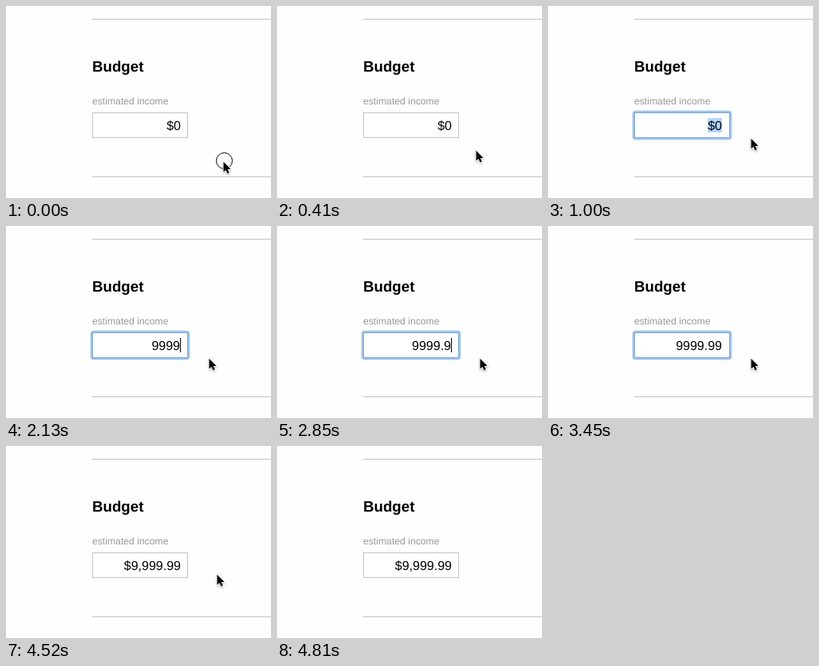
Write an HTML page that moves like this. It is 332 px wide and 240 px high and loops after 5.33 s.

```html
<!DOCTYPE html>
<html lang="en">
<head>
<meta charset="utf-8">
<title>Budget field</title>
<style>
  html, body { margin: 0; width: 100%; height: 100%; overflow: hidden; background: #fefefe; }
  svg { display: block; width: 100vw; height: 100vh; }
  text { font-family: "Liberation Sans", Arial, sans-serif; text-rendering: geometricPrecision; white-space: pre; }
  #arrow { filter: drop-shadow(0 1px 1px rgba(0, 0, 0, .3)); }
</style>
</head>
<body>
<svg viewBox="0 0 332 240">
  <rect width="332" height="240" fill="#fefefe"/>
  <path d="M108 16.5H332M108 213.5H332" stroke="#c2c2c2"/>
  <text x="108" y="82" font-size="18.72" font-weight="700">Budget</text>
  <text x="108" y="123" font-size="12.2" fill="#999">estimated income</text>

  <g id="glow" fill="none" stroke="#6ea6e4">
    <rect x="108" y="133" width="120" height="32" rx="2" stroke-width="5.5" opacity=".3"/>
    <rect x="108" y="133" width="120" height="32" rx="1" stroke-width="3.4" opacity=".6"/>
  </g>
  <rect id="field" x="108.5" y="133.5" width="119" height="31" fill="#fff"/>
  <rect id="highlight" x="200" y="140" width="18" height="18" fill="#b4d4fd"/>
  <text id="value" y="155" font-size="16" text-anchor="end"></text>
  <rect id="caret" x="218" y="140" width="1" height="18"/>

  <circle id="ring" r="10" fill="none" stroke="#000"/>
  <path id="beam" d="M-2.5 -7.5Q0 -7.5 0 -5.5Q0 -7.5 2.5 -7.5M0 -6V6M-2.5 7.5Q0 7.5 0 5.5Q0 7.5 2.5 7.5" fill="none" stroke="#111"/>
  <path id="arrow" d="M.5 .8V13.6L3.4 10.9L5.5 15.6L7.7 14.6L5.7 10.1H9.6Z" stroke="#fff" stroke-width="1.6" paint-order="stroke"/>
</svg>
<script>
const LOOP = 5330;
const $ = id => document.getElementById(id);
const [glow, field, highlight, value, caret, ring, beam, arrow] =
  ["glow", "field", "highlight", "value", "caret", "ring", "beam", "arrow"].map($);

const smooth = p => p * p * (3 - 2 * p);
const easeOut = p => 1 - (1 - p) ** 1.6;
const easeIn = p => p ** 1.3;

// The pointer is sampled in even steps: first step, last step, step count.
const moves = [
  { start: 60, end: 60, steps: 1, from: [272, 194], to: [270, 193], ease: smooth },
  { start: 240, end: 640, steps: 8, from: [270, 193], to: [203.5, 150.5], ease: smooth },
  { start: 760, end: 760, steps: 1, from: [203.5, 150.5], to: [224.5, 150], ease: smooth },
  { start: 820, end: 1000, steps: 4, from: [224.5, 150], to: [254, 165], ease: easeOut },
  { start: 3510, end: 3920, steps: 8, from: [254, 165], to: [260, 150], ease: smooth },
  { start: 4520, end: 4810, steps: 6, from: [260, 150], to: [297, 250], ease: easeIn }
];

const entries = [
  [0, "$0"], [1540, "9"], [1720, "99"], [2010, "999"], [2130, "9999"],
  [2430, "9999."], [2850, "9999.9"], [2970, "9999.99"], [4100, "$9,999.99"]
];

const within = (t, a, b) => t >= a && t < b;
const show = (el, on) => el.setAttribute("visibility", on ? "visible" : "hidden");
const place = (el, x, y) => el.setAttribute("transform", `translate(${x} ${y})`);

function pointerAt(t) {
  const m = moves.findLast(m => t >= m.start);
  if (!m) return moves[0].from;
  const gap = (m.end - m.start) / (m.steps - 1 || 1) || 1;
  const step = Math.min(m.steps, Math.floor((t - m.start) / gap + 0.001) + 1);
  const k = m.ease(step / m.steps);
  return m.from.map((a, i) => a + (m.to[i] - a) * k);
}

function render(t) {
  const focused = within(t, 700, 4100);
  show(glow, focused);
  field.setAttribute("stroke", focused ? "#7fa9da" : "#c6c6c6");
  show(highlight, within(t, 760, 1540));
  show(caret, within(t, 1540, 3450) || within(t, 3980, 4100));
  value.textContent = entries.findLast(e => t >= e[0])[1];
  value.setAttribute("x", within(t, 760, 4100) ? 218 : 219);

  const [x, y] = pointerAt(t);
  const inside = x < 228 && y > 133 && y < 165;
  show(beam, inside);
  show(arrow, !inside && t < 4810);
  place(beam, Math.floor(x) + 0.5, Math.round(y));
  place(arrow, Math.round(x), Math.round(y));

  show(ring, t < 60 || within(t, 700, 760) || within(t, 4100, 4160));
  place(ring, inside ? x : x + 1.5, inside ? y : y - 0.5);
}

const origin = performance.now();
function tick() {
  render((performance.now() - origin) % LOOP);
  requestAnimationFrame(tick);
}
tick();
</script>
</body>
</html>
```
